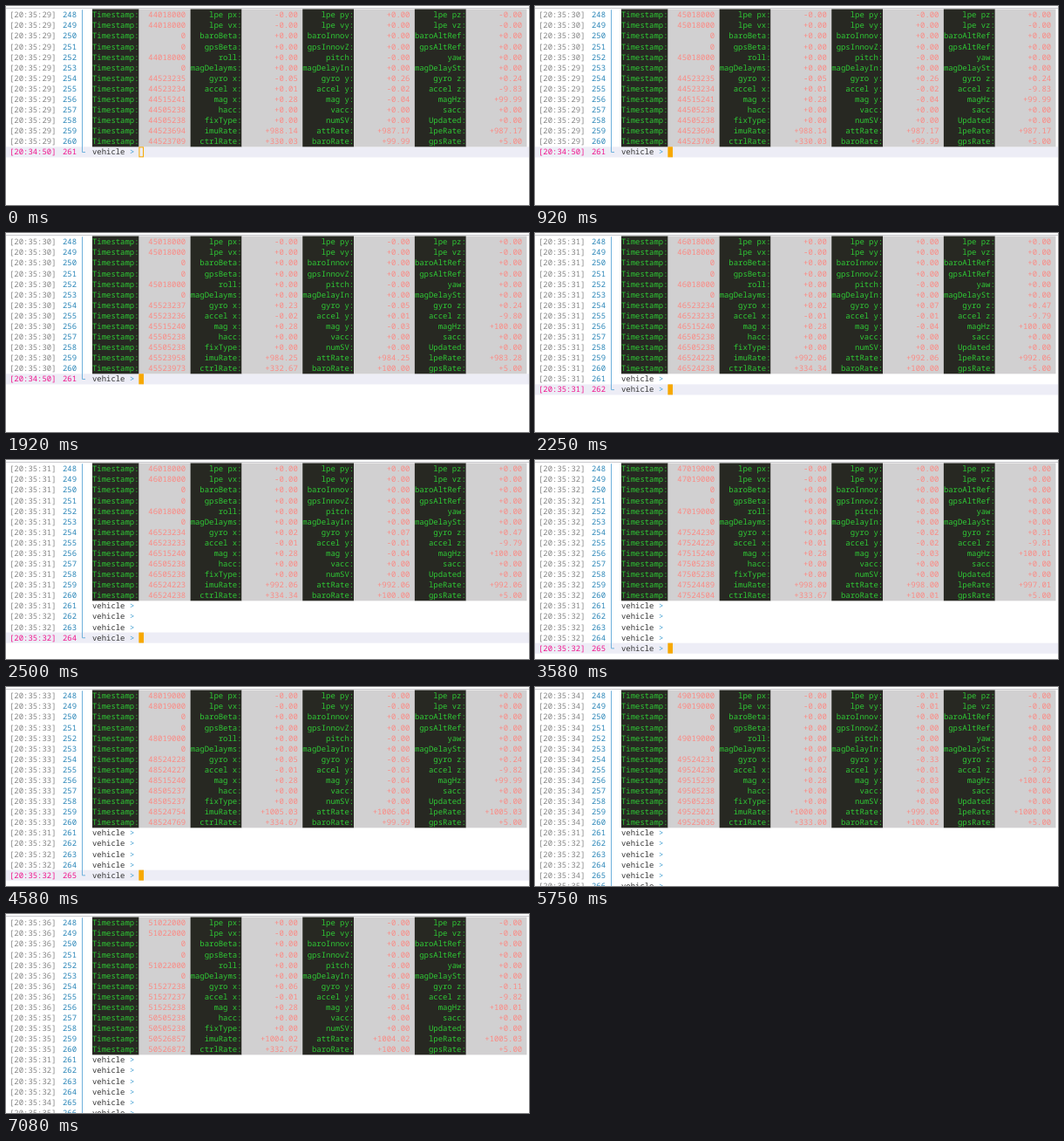
An HTML page that plays this animation: 600x228 px, repeating every 7160 ms.

```html
<!DOCTYPE html>
<html lang="en">
<head>
<meta charset="utf-8">
<title>Telemetry terminal</title>
<style>
  html, body { margin: 0; width: 100%; height: 100%; overflow: hidden; background: #fff; }
  svg { display: block; width: 600px; height: 228px; }
  text {
    font: 8.93px "Noto Sans Mono", "DejaVu Sans Mono", monospace;
    text-rendering: geometricPrecision;
    white-space: pre;
  }
  .stamp { fill: #858585; }
  .num { fill: #2a86b8; }
  .live { fill: #f0148c; }
  .label { fill: #2fcb35; }
  .value { fill: #fb8a84; }
  .prompt { fill: #333; }
  .arrow { fill: #3a9bd0; }
</style>
</head>
<body>
<svg id="stage" viewBox="0 0 600 228"></svg>
<script>
const LOOP = 7160, TICK = 250 / 3;
const CH = 5.36, ROW = 12.08, TOP = 4.3, LEFT = 99;
const STAMP_X = 4, NUM_X = 65, FIRST = 248, ROWS = 13;

const LABELS = [
  'lpe px|lpe py|lpe pz', 'lpe vx|lpe vy|lpe vz',
  'baroBeta|baroInnov|baroAltRef', 'gpsBeta|gpsInnovZ|gpsAltRef',
  'roll|pitch|yaw', 'magDelayms|magDelayIn|magDelaySt',
  'gyro x|gyro y|gyro z', 'accel x|accel y|accel z',
  'mag x|mag y|magHz', 'hacc|vacc|sacc', 'fixType|numSV|Updated',
  'imuRate|attRate|lpeRate', 'ctrlRate|baroRate|gpsRate'
].map(s => s.split('|'));

// start, ticks to redraw, lpe signs, lpe/gyro/mag/imu clock tails, gyro, accel, mag y, mag Hz, rates
const REPORTS = [
  [0, 1, '-+--+-', '018000 523235 515241 523694', '-0.05 +0.26 +0.24', '+0.01 -0.02 -9.83', '-0.04', '+99.99', '+988.14 +987.17 +987.17 +330.03'],
  [920, 3, '--+++-', '018000 523237 515240 523958', '+0.23 -0.05 +0.24', '-0.02 +0.01 -9.80', '-0.03', '+100.00', '+984.25 +984.25 +983.28 +332.67'],
  [2000, 3, '+++-++', '018000 523234 515240 524223', '+0.02 +0.07 +0.47', '-0.01 -0.01 -9.79', '-0.04', '+100.00', '+992.06 +992.06 +992.06 +334.34'],
  [2920, 3, '-++--+', '019000 524230 515240 524489', '+0.04 -0.02 +0.31', '+0.01 -0.02 -9.81', '-0.03', '+100.01', '+998.00 +998.00 +997.01 +333.67'],
  [3920, 3, '--+--+', '019000 524228 515240 524754', '+0.05 -0.06 +0.24', '-0.01 -0.03 -9.82', '-0.04', '+99.99', '+1005.03 +1006.04 +1005.03 +334.67'],
  [4920, 3, '-=--=-', '019000 524231 515239 525021', '+0.07 -0.33 +0.23', '+0.02 +0.01 -9.79', '-0.03', '+100.02', '+1000.00 +999.00 +1000.00 +333.00'],
  [5920, 5, '+-+-+-', '020000 525234 515239 526857', '+0.03 -0.14 +0.12', '+0.01 -0.01 -9.81', '-0.04', '+100.00', '+1004.02 +1004.02 +1005.03 +332.67'],
  [6920, 3, '+---+-', '022000 527238 525238 528686', '+0.06 -0.09 -0.11', '-0.01 +0.01 -9.82', '-0.04', '+100.01', '+1010.10 +1010.10 +1011.12 +332.23']
];

// time the line becomes live, stamp while live, stamp once entered
const PROMPTS = [
  [0, '34:50', '35:31'],
  [2170, '35:31', '35:32'],
  [2330, '35:32', '35:32'],
  [2500, '35:32', '35:32'],
  [2670, '35:32', '35:34'],
  [5000, '35:34', '35:35'],
  [5580, '35:35', '35:35']
];
const FOCUS = 500;

const stage = document.getElementById('stage');
const rowTop = i => TOP + i * ROW;

function add(tag, attrs, parent = stage) {
  const el = document.createElementNS('http://www.w3.org/2000/svg', tag);
  for (const k in attrs) el.setAttribute(k, attrs[k]);
  return parent.appendChild(el);
}
function text(cls, x, row, str = '', anchor = 'start') {
  const el = add('text', { class: cls, x, y: rowTop(row) + 9, 'text-anchor': anchor });
  el.textContent = str;
  return el;
}
function set(el, str) {
  if (el.textContent !== str) el.textContent = str;
}

// Expand one report into 13 rows of [clock, a, b, c]
function expand([, , signs, tails, gyro, accel, magY, hz, rates], i) {
  const sec = 44 + i;
  const clock = n => sec + String(n).padStart(6, '0');
  const [lpe, gy, mag, imu] = tails.split(' ').map(Number);
  const zero = s => [...s].map(c => c === '=' ? '-0.01' : c + '0.00');
  const rate = rates.split(' ');
  const still = ['0', ...zero('+++')], gps = [clock(505238 - (i === 4)), ...zero('+++')];
  return [
    [clock(lpe), ...zero(signs.slice(0, 3))],
    [clock(lpe), ...zero(signs.slice(3))],
    still, still,
    [clock(lpe), ...zero('+-+')],
    still,
    [clock(gy), ...gyro.split(' ')],
    [clock(gy - 1), ...accel.split(' ')],
    [clock(mag), '+0.28', magY, hz],
    gps, gps,
    [clock(imu), ...rate.slice(0, 3)],
    [clock(imu + 15), rate[3], hz, '+5.00']
  ];
}
const tables = REPORTS.map(expand);

// Background blocks
add('rect', { width: 600, height: 228, fill: '#fff' });
add('rect', { y: 2, width: 600, height: 1, fill: '#c9c9cd' });
const band = add('rect', { width: 600, height: ROW, fill: '#ededf6' });
let col = 0;
const edges = [10, 11, 11, 13, 11, 13, 11, 13].map((n, i) => {
  add('rect', {
    x: LEFT + col * CH, y: TOP - .8, width: n * CH, height: ROWS * ROW + .8,
    fill: i % 2 ? '#d1d0d1' : '#272822'
  });
  col += n;
  return LEFT + col * CH;
});
const fold = add('path', { fill: 'none', stroke: '#6fb1dc', 'stroke-width': 1 });

// Table rows
const lines = LABELS.map((names, r) => {
  const stamp = text('stamp', STAMP_X, r);
  text('num', NUM_X, r, String(FIRST + r));
  text('label', LEFT, r, 'Timestamp:');
  names.forEach((s, k) => text('label', edges[2 + 2 * k], r, s + ':', 'end'));
  const cells = [1, 3, 5, 7].map(k => text('value', edges[k] - CH, r, '', 'end'));
  return { stamp, cells };
});

// Prompt rows
const prompts = PROMPTS.map((p, i) => {
  const r = ROWS + i;
  const stamp = text('stamp', STAMP_X, r);
  const num = text('num', NUM_X, r, String(FIRST + r));
  const body = text('prompt', LEFT, r, 'vehicle ');
  const arrow = text('arrow', LEFT + 8 * CH, r, '>');
  return { stamp, num, body, arrow };
});
const cursor = add('rect', { x: LEFT + 10 * CH + .3, width: 4.6, height: ROW - 1.1, stroke: '#f7a800' });

function draw(t) {
  lines.forEach(({ stamp, cells }, r) => {
    let now = 0;
    REPORTS.forEach(([start, ticks], i) => {
      if (t >= start + Math.floor(r * ticks / ROWS) * TICK - 1) now = i;
    });
    set(stamp, `[20:35:${29 + now}]`);
    cells.forEach((c, k) => set(c, tables[now][r][k]));
  });

  let live = 0;
  PROMPTS.forEach(([start], i) => { if (t >= start) live = i; });
  prompts.forEach((p, i) => {
    const [, open, done] = PROMPTS[i], on = i === live;
    const show = i <= live ? 'visible' : 'hidden';
    for (const k in p) p[k].setAttribute('visibility', show);
    set(p.stamp, `[20:${on ? open : done}]`);
    p.stamp.setAttribute('class', on ? 'live' : 'stamp');
    p.num.setAttribute('class', on ? 'live' : 'num');
  });

  const y = rowTop(ROWS + live);
  band.setAttribute('y', y);
  cursor.setAttribute('y', y + .5);
  cursor.setAttribute('fill', t < FOCUS ? 'none' : '#f7a800');
  fold.setAttribute('d', `M87.5 ${TOP}V${y + 6.2}H91`);
}

const begin = performance.now();
function frame() {
  draw((performance.now() - begin) % LOOP);
  requestAnimationFrame(frame);
}
draw(0);
requestAnimationFrame(frame);
</script>
</body>
</html>
```
